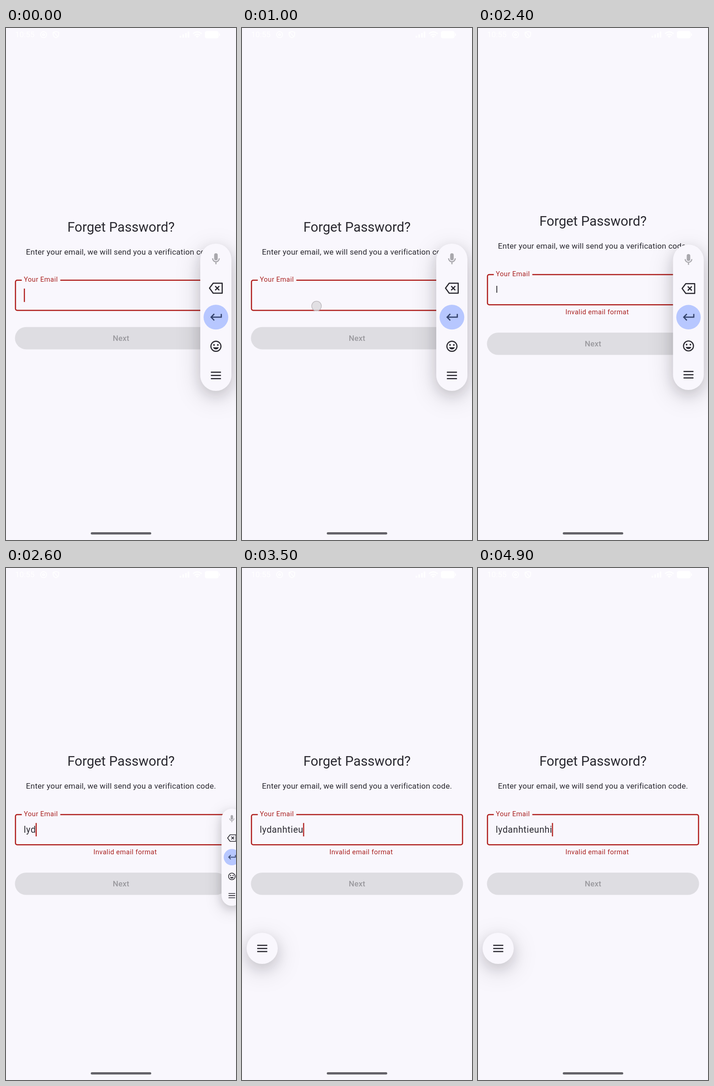
These frames come from a looping animation (502 by 1116 pixels, 5000 ms). An HTML page:

```html
<!DOCTYPE html>
<html lang="en">
<head>
<meta charset="utf-8">
<title>Forget Password</title>
<style>
  html, body { margin: 0; width: 100%; height: 100%; overflow: hidden; background: #f9f7fd; }
  #stage { position: absolute; left: 0; top: 0; width: 502px; height: 1116px; overflow: hidden; background: #f9f7fd; }
  svg { position: absolute; left: 0; top: 0; display: block; overflow: visible; }
  text { font-family: Roboto, "Noto Sans", sans-serif; fill: #2a2930; white-space: pre; }
  .mid { text-anchor: middle; }
  .title { font-size: 29.25px; }
  .lead { font-size: 17.06px; letter-spacing: .24px; }
  .small { font-size: 14.62px; letter-spacing: .487px; fill: #a9211f; }
  .input { font-size: 19.5px; letter-spacing: .61px; }
  .next { font-size: 17.06px; font-weight: 500; letter-spacing: .12px; fill: #9a999e; }
  .clock { font-size: 17.06px; fill: #fff; }
  .bar {
    position: absolute; width: 68.4px; background: #f9f7fd; border-radius: 34.2px;
    box-shadow: 0 14px 56px rgba(20, 15, 25, .17), 0 10px 28px rgba(20, 15, 25, .13);
  }
  #tools { left: 423.6px; top: 470.2px; height: 320.6px; transform-origin: 136.4px 160.3px; }
  #puck { left: 9.8px; top: 794.8px; height: 68.4px; transform-origin: -67.8px 34.2px; }
  .line { fill: none; stroke: #2a2930; stroke-width: 2; }
</style>
</head>
<body>
<div id="stage">
  <svg width="502" height="1116" viewBox="0 0 502 1116">
    <g fill="#fff">
      <text class="clock" x="20" y="20">10:55</text>
      <g fill="none" stroke="#fff" stroke-width="1.8">
        <circle cx="82" cy="14.5" r="6.6"/>
        <circle cx="82" cy="14.5" r="2"/>
        <path d="M109 7.5l6 2v5q0 4-6 7q-6-3-6-7v-5zM104 9l10 11"/>
        <path d="M408 12.5q9.500-8 19 0M411.500 16q6-5 12 0" stroke-width="2.4"/>
      </g>
      <path d="M379 17h3.500v4h-3.500zM385 14h3.500v7h-3.500zM391 11h3.500v10h-3.500zM396.500 7.500h3.500v13.500h-3.500zM414 18l3.500 3.500l3.500-3.500q-3.500-2.500-7 0z"/>
      <rect x="434" y="6.500" width="30" height="16" rx="4.500"/>
      <rect x="465" y="11.500" width="2" height="6" rx="1"/>
    </g>

    <g id="upper">
      <text class="title mid" x="251" y="443.6">Forget Password?</text>
      <text class="lead mid" x="251" y="493.7">Enter your email, we will send you a verification code.</text>
      <path d="M118.500 549.700H477.600a3.700 3.700 0 0 1 3.700 3.700V611.800a3.700 3.700 0 0 1-3.700 3.700H24.400a3.700 3.700 0 0 1-3.700-3.700V553.400a3.700 3.700 0 0 1 3.700-3.700H34.500"
        fill="none" stroke="#b0201e" stroke-width="2.5"/>
      <text class="small" x="39" y="553.2">Your Email</text>
      <text class="input" id="typed" x="38.7" y="589"></text>
      <rect id="caret" y="568" width="2.4" height="29.2" fill="#b0201e"/>
    </g>

    <text class="small" id="error" x="190.700" y="624.200">Invalid email format</text>

    <g id="lower">
      <rect x="19.500" y="651.700" width="463" height="48.700" rx="24.350" fill="#dedde2"/>
      <text class="next mid" x="251" y="682.100">Next</text>
    </g>

    <circle id="touch" cx="162.700" cy="606" r="10.600" fill="#d8d7da" fill-opacity=".75" stroke="#bdb9be" stroke-width="1.3"/>
    <rect x="185" y="1099" width="132" height="5" rx="2.500" fill="#646369"/>
  </svg>

  <div class="bar" id="tools">
    <svg width="68.4" height="320.6" viewBox="-34.2 -160.3 68.4 320.6">
      <g transform="translate(0 -127) scale(1.22) translate(-12 -12)">
        <rect x="8.800" y="2" width="6.400" height="12.500" rx="3.200" fill="#a9a8ad"/>
        <path class="line" d="M6 11a6 6 0 0 0 12 0M12 17v4.500" style="stroke:#a9a8ad"/>
      </g>
      <path class="line" transform="translate(-.3 -63.2) scale(1.27) translate(-12 -12)" stroke-linejoin="round"
        d="M7.500 3.500H23V20.500H7.500L1.200 12ZM11 8.500l7 7m0-7l-7 7"/>
      <circle r="27" fill="#b7c7ff"/>
      <path class="line" transform="scale(1.3) translate(-11.500 -12)" style="stroke:#33426b"
        d="M20.500 6.500V12H3.500M8.700 6.600L3.400 12l5.300 5.400"/>
      <g transform="translate(0 63.500)" fill="#2a2930">
        <circle class="line" r="11" style="stroke-width:2.4"/>
        <circle cx="-4.200" cy="-3" r="1.900"/>
        <circle cx="4.200" cy="-3" r="1.900"/>
        <path d="M-6.300 2.200H6.300Q4.400 6.800 0 6.800T-6.300 2.200Z"/>
      </g>
      <path class="line" d="M-11 120h22M-11 127h22M-11 134h22" style="stroke-width:2.5"/>
    </svg>
  </div>
  <div class="bar" id="puck">
    <svg width="68.4" height="68.4" viewBox="-34.2 -34.2 68.4 68.4">
      <path class="line" d="M-11 -6.700h22M-11 0h22M-11 6.700h22" style="stroke-width:2.5"/>
    </svg>
  </div>
</div>
<script>
  const LOOP = 5000, STEP = 100, SHIFT = 12.2;
  const ENTRY = "lydanhtieunhi";

  // Each table holds [time, value]; a value stays until the next time.
  const letters = [[0, 0], [2300, 1], [2500, 2], [2600, 3], [2800, 4], [2900, 5], [3000, 6],
    [3100, 7], [3200, 8], [3300, 9], [3500, 10], [3700, 11], [4000, 12], [4700, 13]];
  const caretOn = [[0, 1], [600, 0], [1100, 1], [1600, 0], [2100, 1], [2300, 0], [2500, 1]];
  const touchOn = [[0, 0], [900, 1], [1200, 0]];
  const toolScale = [[0, 1], [2400, .988], [2500, .88], [2600, .66], [2700, .36], [2800, 0]];
  const puckScale = [[0, 0], [2800, .4], [2900, .66], [3000, .88], [3100, .97], [3200, 1]];

  const el = id => document.getElementById(id);
  const [upper, lower, typed, caret, error, touch, tools, puck] =
    ["upper", "lower", "typed", "caret", "error", "touch", "tools", "puck"].map(el);

  function at(table, t) {
    let value = table[0][1];
    for (const [time, v] of table) if (time <= t) value = v;
    return value;
  }

  const show = (node, on) => { node.style.visibility = on ? "visible" : "hidden"; };

  function scale(node, s) {
    show(node, s > 0);
    node.style.transform = `scale(${s})`;
  }

  function draw(ms) {
    const t = Math.floor((ms % LOOP) / STEP) * STEP;
    const count = at(letters, t);
    const invalid = count > 0;

    typed.textContent = ENTRY.slice(0, count);
    caret.setAttribute("x", count ? 38 + typed.getComputedTextLength() : 38.9);
    show(caret, at(caretOn, t));
    show(error, invalid);
    show(touch, at(touchOn, t));

    // The error line pushes the centred column apart.
    const shift = invalid ? SHIFT : 0;
    upper.setAttribute("transform", `translate(0 ${-shift})`);
    lower.setAttribute("transform", `translate(0 ${shift})`);

    scale(tools, at(toolScale, t));
    scale(puck, at(puckScale, t));
  }

  const start = performance.now();
  function tick() {
    draw(performance.now() - start);
    requestAnimationFrame(tick);
  }
  tick();
</script>
</body>
</html>
```
